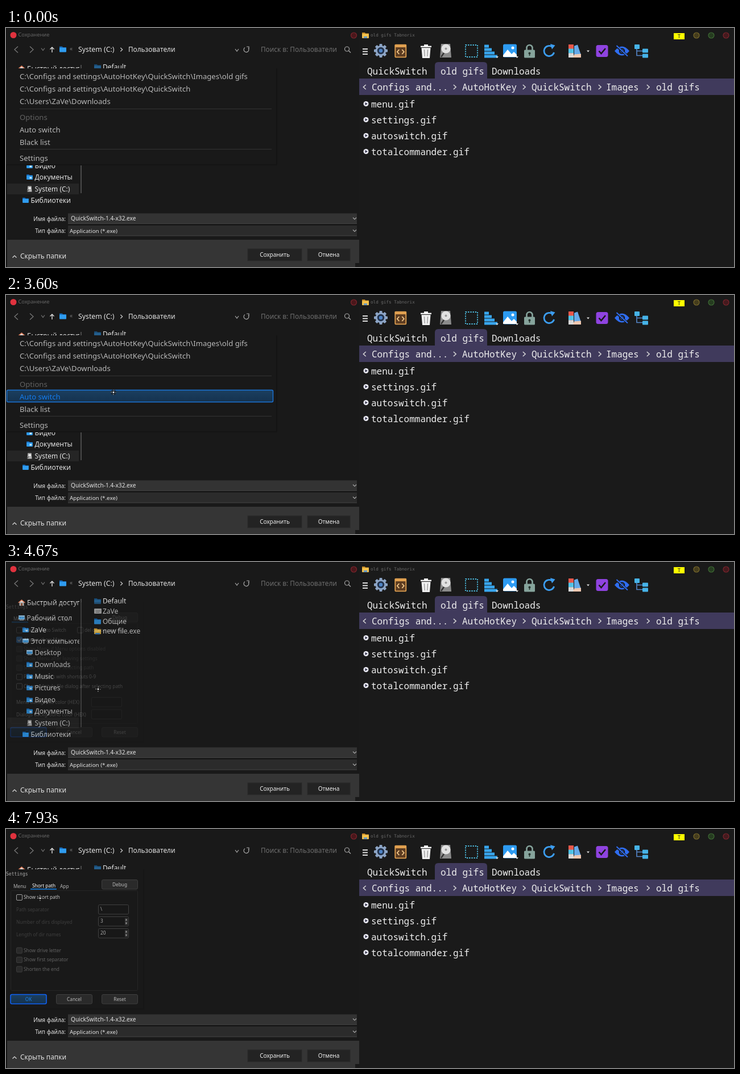
Recreate the animation shown at these times as an HTML page. Size 1280 px wide and 421 px high, loop 8 s.

```html
<!DOCTYPE html>
<html lang="ru">
<head>
<meta charset="utf-8">
<style>
html, body { margin: 0; width: 100%; height: 100%; overflow: hidden; background: #191919; }
svg { display: block; width: 100vw; height: 100vh; font-family: "Noto Sans", sans-serif; }
text { white-space: pre; }
.mono { font-family: "DejaVu Sans Mono", monospace; }
.code { font-family: "Noto Sans Mono", monospace; }
.end { text-anchor: end; }
.mid { text-anchor: middle; }
</style>
</head>
<body>
<svg id="stage" viewBox="0 0 1280 421" preserveAspectRatio="none"></svg>
<script>
const LOOP = 8000;
const BG = '#191919';
const stage = document.getElementById('stage');

// Markup helpers; text is placed by its vertical centre.
const text = (x, y, s, size = 12, fill = '#e4e4e4', cls = '', id = '') =>
  `<text x="${x}" y="${y + size * 0.36}" font-size="${size}" fill="${fill}" class="${cls}" id="${id}">${s}</text>`;
const rect = (x, y, w, h, fill, more = '') =>
  `<rect x="${x}" y="${y}" width="${w}" height="${h}" fill="${fill}" ${more}/>`;
const line = (d, stroke, width = 1.2, more = '') =>
  `<path d="${d}" fill="none" stroke="${stroke}" stroke-width="${width}" ${more}/>`;
const shape = (d, fill, more = '') => `<path d="${d}" fill="${fill}" ${more}/>`;
const dot = (x, y, r, fill, more = '') => `<circle cx="${x}" cy="${y}" r="${r}" fill="${fill}" ${more}/>`;
const group = (id, body, more = '') => `<g id="${id}" ${more}>${body}</g>`;
const at = (x, y, body, k = 1) => `<g transform="translate(${x} ${y}) scale(${k})">${body}</g>`;
const chevron = (x, y, dx, dy, color, width) => dx
  ? line(`M${x - dx} ${y - dy}L${x + dx} ${y}L${x - dx} ${y + dy}`, color, width)
  : line(`M${x - 3} ${y - dy}L${x} ${y + dy}L${x + 3} ${y - dy}`, color, width);

const folder = (x, y, front = '#2f9cf0', back = '#1669b8') => at(x, y,
  shape('M-6 -5h5l1 1.5h6v3h-12z', back) + rect(-6, -2.8, 12, 7.8, front, 'rx="1"'));
const badgeFolder = (x, y) => folder(x, y) + rect(x, y, 4, 3, '#d8efff');
const screen = (x, y) => rect(x - 6, y - 5, 12, 8, '#a9dcff') +
  rect(x - 5, y - 2, 10, 4, '#3ba3f0') + rect(x - 4, y + 3.5, 8, 1.5, '#9ab');
const drive = (x, y) => at(x, y,
  shape('M-3.5 -5.5h7l1 11h-9z', '#b9b9b9') + dot(0.4, -1.5, 3, '#eee', 'stroke="#666" stroke-width=".6"') +
  line('M-1.5 1L-4 4.5', '#444', 1.2));

function treeView() {
  const rows = [
    [50.5, 160, 'Desktop', screen], [50.5, 181, 'Downloads', badgeFolder], [50.5, 202, 'Music', badgeFolder],
    [50.5, 222, 'Pictures', badgeFolder], [50.5, 243, 'Видео', badgeFolder], [50.5, 263, 'Документы', badgeFolder],
    [50.5, 284, 'System (C:)', drive], [36.5, 99, 'Рабочий стол', screen], [43.5, 120, 'ZaVe', badgeFolder],
    [43.5, 140, 'Этот компьютер', screen], [43.5, 304, 'Библиотеки', folder]];
  return rect(2, 274, 126, 19, '#252525') +
    `<g clip-path="url(#treeClip)">` +
    at(27.5, 72, shape('M-6 0L0 -5L6 0H4V5H-4V0z', '#d9d9d9') + line('M-6 0L0 -5L6 0', '#e07a55', 1.6) + rect(-1.2, 0.5, 2.6, 4.5, '#a6542f')) +
    text(37, 72, 'Быстрый доступ') +
    rows.map(([x, y, name, icon]) => at(x - 9, y - 0.5, icon(0, 0), 0.9) + text(x, y, name)).join('') + '</g>' +
    rect(131, 65, 2, 226, '#4a4a4a');
}

function fileDialog() {
  const combo = (y, fill) => rect(109, y, 508, 18, fill) + line(`M109 ${y + 18}H617`, '#454545', 1) +
    chevron(613, y + 9, 0, 1.5, '#aaa', 1.1);
  const button = (x, w, label) => rect(x, 389, w, 21, '#232323', 'stroke="#2a2a2a"') +
    text(x + w / 2, 399.5, label, 10, '#eee', 'mid');
  return rect(0, 0, 621, 421, BG) + line('M.5 0V421M0 .5H1280', '#101010', 1) +
    dot(13, 12.5, 5.5, '#e0323e') +
    text(21.5, 12, 'Сохранение', 9.2, '#666', '', 'dialogTitle') +
    dot(611.5, 13, 5, '#4a171b', 'id="dialogClose" stroke="#7d252d" stroke-width="1.2"') +
    chevron(18, 38, -3, 5.5, '#777', 1.3) + chevron(45, 38, 3, 5.5, '#777', 1.3) + chevron(65, 37.5, 0, 2, '#777') +
    line('M81 43V34M77.5 37.5L81 34L84.5 37.5', '#ddd', 1.4) + folder(100, 37.5) +
    text(112, 36, '«', 10, '#777') + text(127, 38, 'System (C:)', 12.3) +
    chevron(203, 38, 1.7, 3.2, '#ccc') + text(215, 38, 'Пользователи', 11.8) +
    chevron(406, 39, 0, 2, '#aaa') +
    line('M426 35.5A4.4 4.4 0 1 1 420 34.5M423 33H427V37', '#aaa') +
    text(448, 38, 'Поиск в: Пользователи', 11.8, '#6f6f6f') +
    dot(599.5, 37, 4, 'none', 'stroke="#aaa" stroke-width="1.2"') + line('M602.5 40L606 43.5', '#aaa') +
    treeView() +
    folder(161, 69, '#245e8c', '#17466e') + text(170, 69, 'Default') +
    rect(155, 82, 13, 9, '#b9b9b9', 'rx="1"') + line('M158 86H166M158 88.5H164', '#777') + text(170, 87, 'ZaVe') +
    folder(161, 104.5) + text(170, 104.5, 'Общие') +
    folder(161, 122, '#f6c64c', '#d99a22') + rect(157, 125, 8, 2.5, '#3c8fe0') + text(170, 122, 'new file.exe') +
    text(105, 336, 'Имя файла:', 10, '#e4e4e4', 'end') + combo(326.5, '#333') +
    rect(113, 328, 117, 14, '#0a7df0', 'id="selection"') + text(114, 335.5, 'QuickSwitch-1.4-x32.exe', 10.1) +
    text(105, 357, 'Тип файла:', 10, '#e4e4e4', 'end') + combo(348, '#2b2b2b') + text(112, 357, 'Application (*.exe)', 9.8) +
    shape('M2 373H621V414H614V421H2z', '#353535') +
    line('M11.5 404.5L15 401L18.5 404.5', '#ddd') + text(25, 402, 'Скрыть папки', 11.8) +
    button(425, 95, 'Сохранить') + button(530, 75, 'Отмена');
}

function toolbar() {
  const teeth = [0, 45, 90, 135].map(a => rect(-2.5, -12, 5, 24, '#8da5c6', `rx="1" transform="rotate(${a})"`)).join('');
  return line('M627 37H636M627 41.5H636M627 46H636', '#ddd', 2) +
    at(659, 40, teeth + dot(0, 0, 9.3, '#8da5c6') + dot(0, 0, 6.2, '#22324b') + dot(0, 0, 3.2, '#4f83c4')) +
    at(693.8, 40.5, rect(-9.5, -10.8, 19, 21.6, '#5d3d22', 'rx="1" stroke="#e0a050" stroke-width="1.8"') +
      rect(-10, -11.5, 20, 5, '#e0a050') + line('M-2.5 -2.5L-6 1.5L-2.5 5.5M2.5 -2.5L6 1.5L2.5 5.5', '#f2c98c', 1.8)) +
    at(738.5, 41, shape('M-8 -6H8L6.5 12H-6.5z', '#f0f0f0') + rect(-9.5, -9.5, 19, 2.5, '#f0f0f0') +
      rect(-3.5, -12, 7, 3, '#f0f0f0') + line('M-3 -3L-2.3 9M3 -3L2.3 9', '#999', 1.4)) +
    at(773, 40, shape('M-8 -12H8L10 12H-10z', '#8b8b8b') + dot(0.5, -3.5, 8, '#e2e2e2') + dot(0.5, -3.5, 2, '#999') +
      line('M-3 4L-8 11', '#333', 2.4)) +
    rect(808, 30, 21, 21, 'none', 'stroke="#4fc3e8" stroke-width="1.8" stroke-dasharray="2.2 2"') +
    [[8, 30], [13, 36], [18, 42], [23, 48]].map(([w, y]) => rect(841, y - 0.5, w, 5, '#38a6ee')).join('') +
    shape('M861 50h5l-2.5 3zM896 50h5l-2.5 3zM1021 39.5h5l-2.5 3z', '#ddd') +
    at(886, 40, rect(-12, -11.5, 24, 23, '#2d9bf2', 'rx="2.5"') + shape('M-12 8L-4 -2L3 6L7 2L12 7V11H-12z', '#fff') + dot(5, -5, 2.5, '#fff')) +
    at(920.5, 41, line('M-5 -2V-6A5 5 0 0 1 5 -6V-2', '#86a49c', 2.6) + rect(-9.5, -2.5, 19, 14, '#86a49c', 'rx="1.5"') +
      dot(0, 3.5, 2, '#26352f') + rect(-0.8, 4, 1.6, 4, '#26352f')) +
    at(955, 40.5, line('M8.6 2.5A9 9 0 1 1 4.5 -7.8', '#3c9df0', 2.8) + shape('M2 -12.5L10.5 -10L5 -3z', '#3c9df0')) +
    at(1000, 40.5, rect(-11, -11.5, 9, 23, '#e8574a') + rect(-11, -4, 9, 8, '#4fc3e8') + rect(-11, 4, 9, 7.5, '#d9d9d9') +
      shape('M-1 -9L5 -11L11 7L-1 11z', '#65a9e8') + shape('M-1 6L11 5V11.5H-3z', '#f0c8b0')) +
    at(1048, 40.5, rect(-10.5, -10.5, 21, 21, '#8f43e0', 'rx="3.5"') + line('M-5.5 0L-1.5 4.5L6 -4.5', BG, 2.5)) +
    at(1083, 40.5, shape('M-13 0Q0 -16 13 0Q0 16 -13 0z', '#2f6df0') + dot(0, 0, 5.3, BG) + dot(0, 0, 3, '#2f6df0') +
      line('M-10 -9L10 9', BG, 4) + line('M-9.5 -9.5L10 9', '#2f6df0', 2)) +
    at(1117, 40.5, line('M-8 -6V8H3M-8 0H3', '#58c', 1.6) + rect(-12, -11.5, 9, 8, '#46b3e8', 'rx="1"') +
      rect(2, -4, 10, 7, '#46b3e8', 'rx="1"') + rect(2, 5, 10, 7, '#46b3e8', 'rx="1"'));
}

function fileManager() {
  const label = (x, y, s) => text(x, y, s, 16, '#efefef', 'code');
  const ring = (x, fill, stroke) => dot(x, 13, 5, fill, `stroke="${stroke}" stroke-width="1.2"`);
  const crumbs = [[643, 'Configs and...', 789], [802, 'AutoHotKey', 911], [924, 'QuickSwitch', 1044], [1055, 'Images', 1129], [1143, 'old gifs']];
  const files = ['menu.gif', 'settings.gif', 'autoswitch.gif', 'totalcommander.gif'];
  return rect(621, 1, 659, 420, '#1a1a1a') +
    folder(632, 13, '#f2c14e', '#c98c24') + rect(629, 15, 6, 2.5, '#4a90d9') +
    text(641, 12.5, 'old gifs Tabnorix', 7.6, '#6a6a6a', 'mono') +
    rect(1174, 9, 19, 11, '#ffff00') + text(1183.5, 14.5, 'T', 9.5, '#222', 'mid') +
    ring(1214, '#453d1d', '#7a6a2c') + ring(1240, '#263c20', '#3f6b35') + ring(1266, '#451a1e', '#7d252d') +
    toolbar() +
    shape('M754 90V66Q754 60 760 60H840Q846 60 846 66V90z', '#403a5c') + rect(621, 89, 659, 29, '#403a5c') +
    label(635, 76, 'QuickSwitch') + label(764, 76, 'old gifs') + label(854, 76, 'Downloads') +
    chevron(630.5, 104, -2.2, 4, '#ddd', 1.4) +
    crumbs.map(([x, s, sep]) => label(x, 104, s) + (sep ? chevron(sep, 104, 2.2, 4, '#ddd', 1.4) : '')).join('') +
    files.map((s, i) => at(633, 133.5 + i * 28, dot(0, 0, 4.5, '#e9e9f2') + shape('M-1.5 -2.5L2.8 0L-1.5 2.5z', '#33334a')) +
      label(642, 134 + i * 28, s)).join('');
}

const menuRows = [
  [85, 'C:\\Configs and settings\\AutoHotKey\\QuickSwitch\\Images\\old gifs'],
  [107, 'C:\\Configs and settings\\AutoHotKey\\QuickSwitch'],
  [129, 'C:\\Users\\ZaVe\\Downloads'],
  [179, 'Auto switch'], [201, 'Black list'], [229, 'Settings']];

const popupMenu = () =>
  rect(0, 71, 477, 171, '#141414') + rect(0, 71, 475, 169, BG) +
  line('M24 142.5H467M24 213.5H467', '#333', 1) +
  rect(1.5, 73.5, 468, 21, 'url(#hoverFill)', 'id="menuHover" rx="2" stroke="#1b74d8" stroke-width="1.4"') +
  text(24, 157, 'Options', 13.1, '#626262') +
  menuRows.map(([y, s]) => text(24, y, s, 13.1, '#b9b9b9', 'menuRow')).join('');

function settingsWindow() {
  const small = (x, y, s, fill = '#c4c4c4', cls = '') => text(x, y, s, 8.3, fill, cls);
  const check = (x, y, s, on = true, id = '') =>
    rect(x + 0.5, y - 5, 10, 10, on ? '#1c1c1c' : '#292929', `rx="1.5" id="${id}" stroke="${on ? '#787878' : '#3c3c3c'}"`) +
    small(x + 13, y, s, on ? '#c4c4c4' : '#626262');
  const button = (x, y, s, w = 63, fill = '#2a2a2a', stroke = '#3f3f3f', color = '#bbb', border = 1) =>
    rect(x + 0.5, y + 0.5, w, 16.5, fill, `rx="2.5" stroke="${stroke}" stroke-width="${border}"`) +
    small(x + w / 2 + 0.5, y + 8.8, s, color, 'mid');
  const field = (x, y, value = '') => rect(x + 0.5, y + 0.5, 53, 16.5, '#181818', 'rx="2" stroke="#404040"') + small(x + 4, y + 8, value, '#aaa');
  const spin = (x, y, value) => field(x, y, value) + rect(x + 47, y + 3, 5, 12, '#3a3a3a') +
    shape(`M${x + 48} ${y + 7}l1.5 -2.5l1.5 2.5zM${x + 48} ${y + 11}l1.5 2.5l1.5 -2.5z`, '#aaa');
  const tabs = active => ['Menu', 'Short path', 'App'].map((s, i) =>
    small([13, 46, 95][i], i === active ? 100.3 : 101.3, s, i === active ? '#fff' : '#b5b5b5')).join('') +
    rect([10, 43][active], 105, [29, 46][active], 1.6, '#1683e8');

  const menuPage = tabs(0) +
    check(18, 120, 'Always Auto Switch') + check(125, 120, 'del dialogs config') +
    rect(18, 131.5, 11, 11, '#3793f0', 'rx="2"') + line('M20.5 137L23 139.5L27 134.5', '#fff', 1.3) + small(31, 137, 'Always show Menu') +
    check(18, 153.5, 'Show Menu if Menu options disabled', false) +
    check(18, 170, 'Show Menu after leaving settings', false) +
    check(18, 186.3, 'Show Menu after selecting path', false) +
    check(18, 202.5, 'Path numbers with shortcuts 0-9') +
    check(18, 219, 'Close old-style file dialog after selecting path', true, 'closeCheck') +
    small(18, 247, 'Menu backgroud color (HEX)') + field(150, 238) +
    small(18, 269, 'Dialogs background color (HEX)') + field(150, 259.5);
  const pathPage = tabs(1) +
    check(18, 120.5, 'Show short path', true, 'shortCheck') +
    small(18, 142.5, 'Path separator', '#3e3e3e') + field(162, 133, '\\') +
    small(18, 164.5, 'Number of dirs displayed', '#3e3e3e') + spin(162, 154, '3') +
    small(18, 186.5, 'Length of dir names', '#3e3e3e') + spin(162, 175, '20') +
    check(18, 214, 'Show drive letter', false) + check(18, 230.5, 'Show first separator', false) + check(18, 247, 'Shorten the end', false);

  return rect(0, 71, 243, 247, '#161616') + rect(0, 71, 241, 245, BG) +
    text(0, 79, 'Settings', 8, '#aaa', 'mono') +
    rect(8.5, 108.5, 223, 176, 'none', 'rx="2" stroke="#262626"') +
    button(168, 89, 'Debug') + group('menuPage', menuPage) + group('pathPage', pathPage) +
    button(7.5, 291, 'OK', 63, 'url(#hoverFill)', '#0f62f5', '#1a80ea', 1.6) + button(88, 291, 'Cancel') + button(168, 291, 'Reset');
}

const pointer = dot(0, 0, 5, '#161616', 'opacity=".55"') +
  dot(0, 0, 3.8, 'none', 'stroke="#999" stroke-width="1.3" stroke-dasharray="1.8 4.17" stroke-dashoffset=".9"') + dot(0, 0, 1.4, '#eee');

stage.innerHTML = `<defs>
  <clipPath id="treeClip"><rect x="2" y="64" width="127" height="250"/></clipPath>
  <linearGradient id="hoverFill" x1="0" x2="0" y1="0" y2="1"><stop stop-color="#1b3f60"/><stop offset="1" stop-color="#15324e"/></linearGradient>
</defs>` + fileDialog() + fileManager() + group('popup', popupMenu()) + group('settings', settingsWindow()) + group('pointer', pointer);

const part = id => document.getElementById(id);
const show = (id, on) => { part(id).style.display = on ? '' : 'none'; };
const rowLabels = [...document.querySelectorAll('.menuRow')];

// Pointer path: [tick, x, y], 15 ticks per second.
const path = [[11, 143, 37], [21, 157, 87], [23, 160, 89], [29, 184, 107], [30, 184, 107], [36, 207, 128], [51, 207, 128],
  [57, 171, 215], [60, 162, 224], [81, 162, 224], [82, 160, 217], [92, 65, 106], [115, 65, 106], [119, 60, 122]];

function pointerAt(tick) {
  const next = path.findIndex(p => p[0] >= tick);
  if (next < 1) return path[0].slice(1);
  const [t0, x0, y0] = path[next - 1], [t1, x1, y1] = path[next];
  const k = (tick - t0) / (t1 - t0);
  return [x0 + (x1 - x0) * k, y0 + (y1 - y0) * k];
}

function draw(ms) {
  const tick = Math.min(119, Math.floor((ms + 5) * 0.015));
  const [x, y] = pointerAt(tick);
  const menuOpen = tick < 66;
  const dialogActive = tick >= 66 && tick < 70;

  show('pointer', tick >= 11);
  part('pointer').setAttribute('transform', `translate(${x} ${y})`);

  show('popup', menuOpen);
  const hovered = menuOpen ? menuRows.findIndex(([cy]) => Math.abs(y - cy) <= 11) : -1;
  show('menuHover', hovered >= 0);
  if (hovered >= 0) part('menuHover').setAttribute('y', menuRows[hovered][0] - 11.5);
  rowLabels.forEach((label, i) => label.setAttribute('fill', i === hovered ? '#147df0' : '#b9b9b9'));

  show('selection', dialogActive);
  part('dialogTitle').setAttribute('fill', dialogActive ? '#ddd' : '#666');
  part('dialogClose').setAttribute('fill', dialogActive ? '#a52a35' : '#4a171b');
  part('dialogClose').setAttribute('stroke', dialogActive ? '#f04452' : '#7d252d');

  show('settings', tick >= 70);
  part('settings').setAttribute('opacity', Math.min(1, (tick - 69) / 4));
  show('menuPage', tick < 108);
  show('pathPage', tick >= 108);
  part('closeCheck').setAttribute('stroke', y > 211 && y < 227 ? '#a0a0a0' : '#787878');
  part('shortCheck').setAttribute('stroke', y > 112 ? '#a0a0a0' : '#787878');
}

const start = performance.now();
function frame() {
  draw((performance.now() - start) % LOOP);
  requestAnimationFrame(frame);
}
frame();
</script>
</body>
</html>
```
